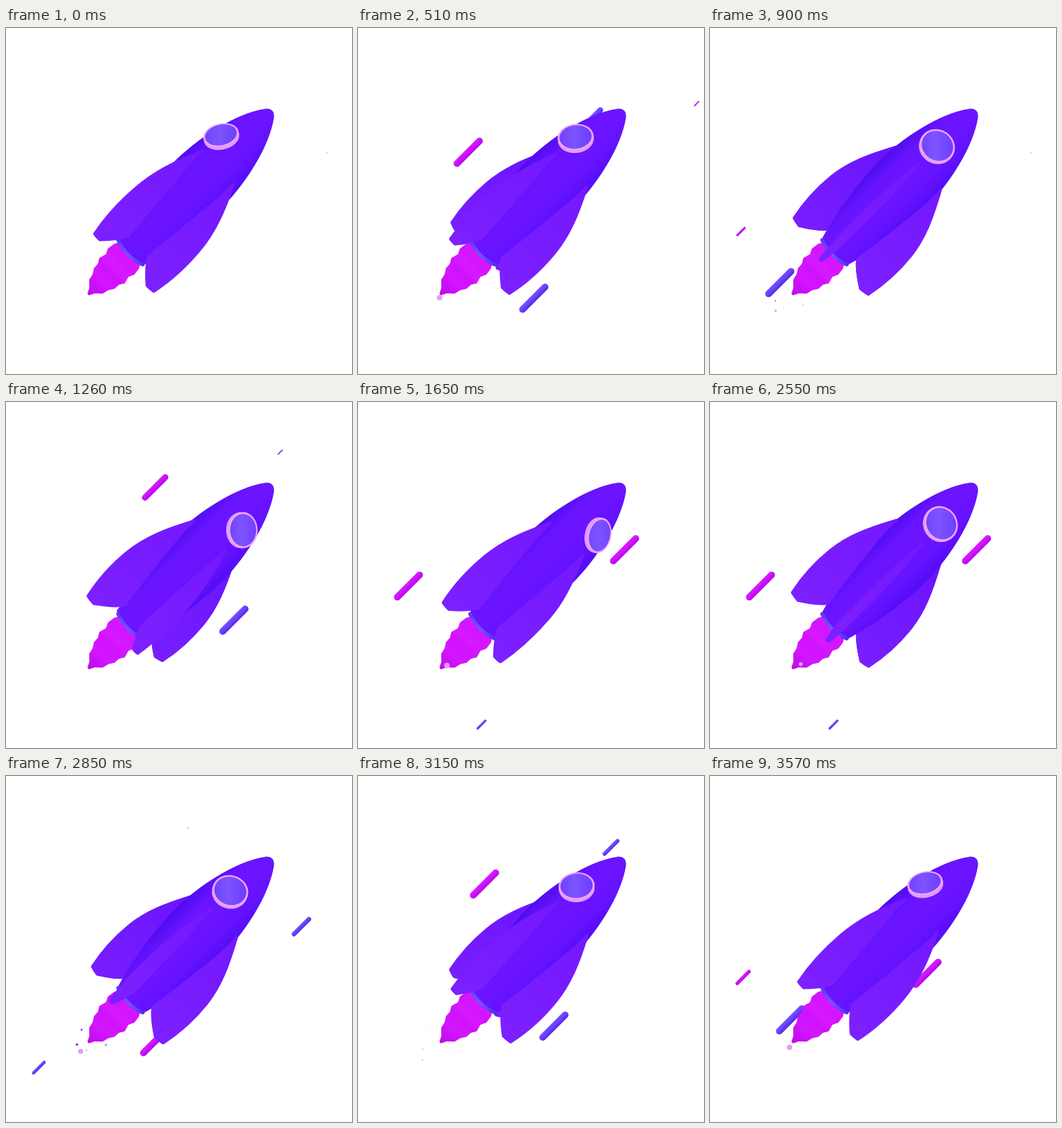
Recreate the animation shown at these times as an HTML page with a canvas. Size 512 by 512 pixels, loop 3600 ms.

```html
<!DOCTYPE html>
<html>
<head>
<meta charset="utf-8">
<style>
html, body { margin: 0; width: 100%; height: 100%; overflow: hidden; background: #fff; }
canvas { display: block; }
</style>
</head>
<body>
<canvas id="stage" width="512" height="512"></canvas>
<script>
const ctx = document.getElementById('stage').getContext('2d');
const LOOP = 3600, DEPTH = 676, TAU = Math.PI * 2;

const ease = x => (x = Math.min(1, Math.max(0, x)), x * x * (3 - 2 * x));

function gradient(x0, y0, x1, y1, ...colors) {
  const g = ctx.createLinearGradient(x0, y0, x1, y1);
  colors.forEach((c, i) => g.addColorStop(i / (colors.length - 1), c));
  return g;
}

// The rocket axis is x; u runs along it, r outwards and side around it.
function project(u, r, side, angle) {
  const y = r * Math.sin(angle) + side * Math.cos(angle);
  const z = r * Math.cos(angle) - side * Math.sin(angle);
  const k = DEPTH / (DEPTH - z);
  return [u * k, y * k];
}

// Streaks: start time, first x, last x, x + y, colour
const PURPLE = ['#7452ff', '#6a42fa', '#5426e4'], MAGENTA = ['#d41cff', '#cc14fa', '#b400e6'];
const streaks = [
  [-45, 478, 180, 660, PURPLE],
  [102, 272, 44, 347, MAGENTA],
  [274, 417, 42, 480, PURPLE],
  [422, 512, 164, 613, MAGENTA]
];

function drawStreak(t, [start, from, to, sum, colors]) {
  if (t < start) return;
  const life = 843, age = (t - start) % 900, left = life - age;
  if (left <= 0) return;
  const size = ease(age / 320) * Math.sin(Math.PI / 2 * Math.min(1, left / 210));
  if (size < 0.05) return;
  const x = from + (to - from) * ease(age / life);
  const u = (2 * x - sum) / Math.SQRT2, v = (sum - 516) / Math.SQRT2, half = 23.5 * size;
  ctx.strokeStyle = gradient(0, v - 5 * size, 0, v + 5 * size, ...colors);
  ctx.lineWidth = 10 * size;
  ctx.beginPath();
  ctx.moveTo(u - half, v);
  ctx.lineTo(u + half, v + 0.01);
  ctx.stroke();
}

// Fin outline as cubic curves: u, r, half thickness
const fin = [
  [71, 46, 0],
  [35, 65.5, 3], [5, 79.5, 3], [-28, 83, 3],
  [-60, 86.5, 3], [-85, 84.5, 3], [-112, 79, 1],
  [-113, 75, 1], [-114, 70, 1], [-114.5, 65, 1],
  [-108, 55, 2], [-99, 40, 2], [-87, 31, 2],
  [-50, 37, 3], [-10, 42, 3], [20, 45, 3],
  [40, 47, 2], [55, 48, 1], [71, 46, 0]
];

function drawFin(angle) {
  const front = Math.cos(angle) > 0;
  ctx.fillStyle = ctx.strokeStyle = front
    ? gradient(70, 0, -115, 0, '#7418ff', '#7c20ff')
    : gradient(70, 0, -115, 0, '#6a14ff', '#781eff');
  ctx.lineWidth = 3.5;
  for (const s of [-1, 0, 1]) {
    const p = fin.map(([u, r, w]) => project(u, r, w * s, angle));
    ctx.beginPath();
    ctx.moveTo(...p[0]);
    for (let i = 1; i < p.length; i += 3) ctx.bezierCurveTo(...p[i], ...p[i + 1], ...p[i + 2]);
    ctx.closePath();
    ctx.fill();
    ctx.stroke();
  }
}

// Upper edge of the ridged flame; the lower edge mirrors it.
const flame = [[-106, -21], [-113, -25], [-124, -26.5], [-132, -22.5], [-143, -25.5], [-150, -21],
  [-159, -20.5], [-167, -15.5], [-176, -13.4], [-184, -5], [-192, -1]];

function drawFlame() {
  ctx.fillStyle = ctx.strokeStyle = gradient(-106, 0, -192, 0,
    '#d818ff', '#d214ff', '#d818ff', '#ce12fc', '#d416ff', '#c810f4', '#c00ce8');
  ctx.lineWidth = 2;
  ctx.beginPath();
  for (const [u, v] of flame) ctx.lineTo(u, v);
  for (const [u, v] of [...flame].reverse()) ctx.lineTo(u, -v);
  ctx.closePath();
  ctx.fill();
  ctx.stroke();
  ctx.strokeStyle = gradient(0, -26, 0, 26, '#5a3cf0', '#6e58ff', '#5030f0');
  ctx.lineWidth = 7;
  ctx.beginPath();
  ctx.moveTo(-104, -25);
  ctx.quadraticCurveTo(-112, 0, -104, 25);
  ctx.stroke();
}

function drawBody() {
  ctx.fillStyle = gradient(0, -49, 0, 49, '#500cf0', '#6814ff', '#6c14ff', '#6412ff', '#540cf6');
  ctx.beginPath();
  ctx.moveTo(-101, -28);
  ctx.bezierCurveTo(-60, -40, -15, -47, 30, -49);
  ctx.bezierCurveTo(85, -50, 152, -35, 187, -9);
  ctx.quadraticCurveTo(197, 0, 187, 9);
  ctx.bezierCurveTo(152, 35, 85, 50, 30, 49);
  ctx.bezierCurveTo(-15, 47, -60, 40, -101, 28);
  ctx.quadraticCurveTo(-113, 0, -101, -28);
  ctx.fill();
}

function drawWindow(angle) {
  const slope = 0.31, sin = Math.sin(slope), cos = Math.cos(slope);
  const plate = (height, radius, color) => {
    ctx.fillStyle = color;
    ctx.beginPath();
    for (let a = 0; a < TAU; a += 0.1) {
      const c = radius * Math.cos(a);
      ctx.lineTo(...project(106 + c * cos + height * sin, 36 - c * sin + height * cos,
        radius * Math.sin(a), angle));
    }
    ctx.fill();
  };
  for (let h = 0; h < 6; h++) plate(h, 25, '#e29cf6');
  plate(6, 25, '#f0a4ff');
  const [, v] = project(106, 42, 0, angle);
  plate(6, 22.4, gradient(90, v - 20, 130, v + 20, '#6c3cfa', '#7c54ff', '#6c3cff'));
}

// Sparks: moment of birth, start x, y, end x, y, radius, colour
const bursts = [300, 1570, 2500, 3320], SPARK_LIFE = 720;
const sparks = [
  [0, 139, 384, 94, 421, 4.2, '#e49cf8'],
  [0.4, 122, 384, 95, 405, 2.2, '#5a30f0'],
  [0.4, 168, 372, 136, 413, 2, '#c070f4'],
  [0.4, 140, 388, 107, 416, 1.6, '#e49cf8'],
  [0.4, 122, 378, 106, 374, 1.8, '#5a30f0']
];

function drawSparks(t) {
  for (const start of bursts) {
    const p = (t - start) / SPARK_LIFE;
    if (p <= 0 || p >= 1) continue;
    const path = 1 - (1 - p) ** 1.5;
    for (const [birth, x0, y0, x1, y1, r, color] of sparks) {
      ctx.fillStyle = color;
      ctx.beginPath();
      ctx.arc(x0 + (x1 - x0) * path, y0 + (y1 - y0) * path,
        r * ease((p - birth) * 9) * (1 - p ** 3), 0, TAU);
      ctx.fill();
    }
  }
}

function draw(t) {
  const roll = ease((t - 220) / 1470) - ease((t - 1690) / 1910);
  const angle = (-40.5 + 80.5 * roll) * Math.PI / 180;
  const fins = [0, 1, 2, 3].map(i => angle + i * Math.PI / 2);

  ctx.setTransform(1, 0, 0, 1, 0, 0);
  ctx.fillStyle = '#fff';
  ctx.fillRect(0, 0, 512, 512);
  ctx.lineCap = ctx.lineJoin = 'round';

  ctx.translate(258, 258);
  ctx.rotate(-Math.PI / 4);
  streaks.forEach(s => drawStreak(t, s));
  fins.filter(a => Math.cos(a) <= 0).forEach(drawFin);
  drawFlame();
  drawBody();
  fins.filter(a => Math.cos(a) > 0).forEach(drawFin);
  drawWindow(angle);

  ctx.setTransform(1, 0, 0, 1, 0, 0);
  drawSparks(t);
}

const begin = performance.now();
function tick() {
  draw((performance.now() - begin) % LOOP);
  requestAnimationFrame(tick);
}
tick();
</script>
</body>
</html>
```
